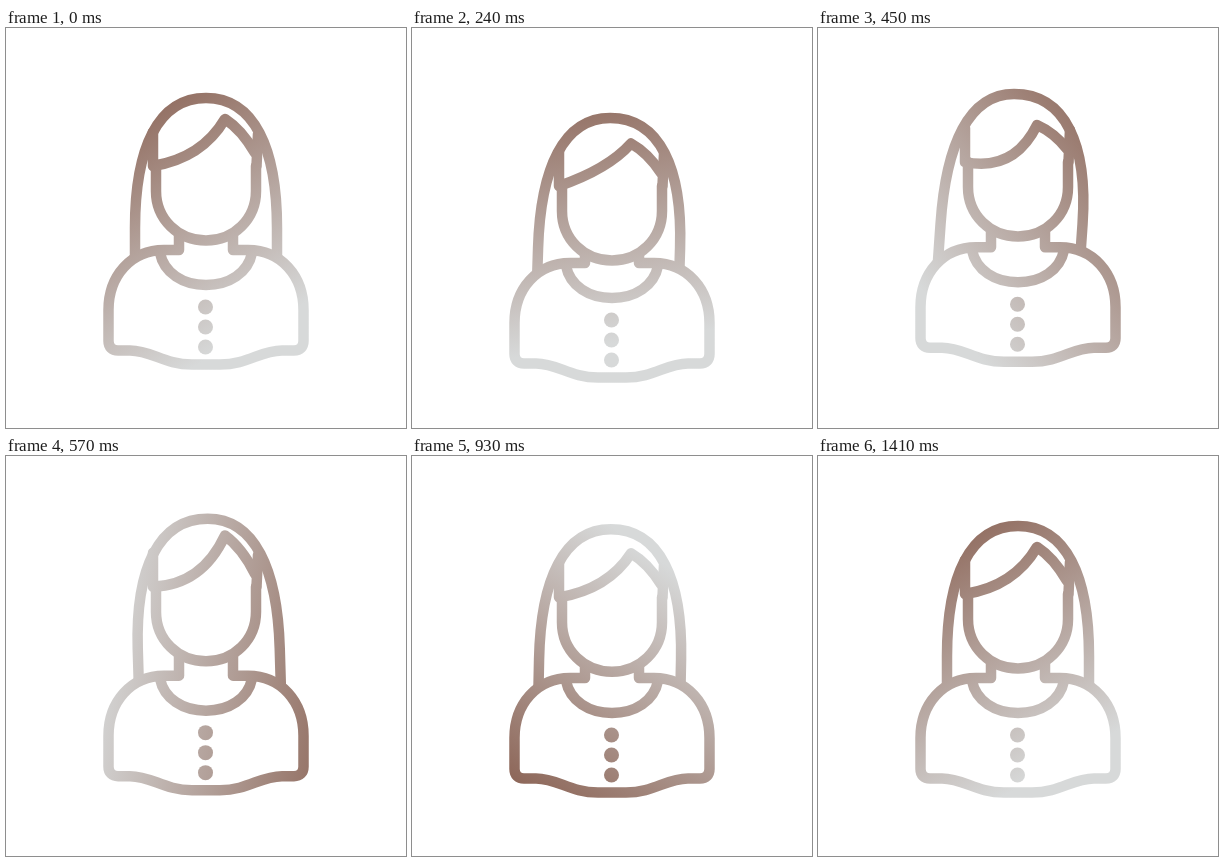
An HTML page with a canvas for the animation above (1.95 s loop, 400 by 400 pixels).

```html
<!DOCTYPE html>
<html lang="en">
<head>
<meta charset="utf-8">
<title>Avatar</title>
<style>
html, body { margin: 0; width: 100%; height: 100%; overflow: hidden; background: #fff; }
canvas { display: block; width: 400px; height: 400px; }
</style>
</head>
<body>
<canvas id="stage" width="400" height="400"></canvas>
<script>
const ctx = document.getElementById('stage').getContext('2d');
const LOOP = 1950, STEP = 30, REST = 1410, TRAIL = 90;
const DARK = '#8c6557', LIGHT = '#d7d9d9';

const linear = u => u;
const smooth = u => u * u * (3 - 2 * u);

// Moves through [ms, value] stops, holding the first and last value outside them.
const motion = (ease, ...stops) => t => stops.reduce((value, [end, to], i) => {
  if (i === 0) return to;
  const start = stops[i - 1][0];
  const u = Math.max(0, Math.min(1, (t - start) / (end - start)));
  return value + (to - stops[i - 1][1]) * ease(u);
}, 0);

const bodyY = motion(smooth, [0, 0], [180, 15], [470, -3], [800, 0]);
const headY = motion(smooth, [0, 0], [245, 20], [515, -8], [860, 3.5], [REST, 0]);
const swing = motion(smooth, [0, 0], [140, 9], [340, -18], [630, 7], [1000, -4], [REST, 0]);
const lightAngle = motion(linear, [0, -30], [330, 0], [690, 150], [930, 215], [1080, 330]);

// Shapes are offset by coordinate so the gradient stays fixed to the stage.
function trace(dy, commands, filled) {
  const place = (n, i) => i % 2 ? n + dy : n;
  const path = new Path2D(commands.map(([op, ...xy]) => op + xy.map(place).join(' ')).join(''));
  if (filled) {
    ctx.fillStyle = '#fff';
    ctx.fill(path);
  }
  ctx.stroke(path);
}

// Follows one half of a symmetric outline down, then its mirror image back up.
function mirrored(start, ...curves) {
  const flip = xy => xy.map((n, i) => i % 2 ? n : 400 - n);
  const points = [start, ...curves.flatMap(c => c.reduce(
    (pairs, n, i) => i % 2 ? pairs : [...pairs, [n, c[i + 1]]], []))];
  const back = points.map(flip).reverse();
  const bottom = back[0];
  const result = [['M', ...start], ...curves.map(c => [c.length === 2 ? 'L' : 'C', ...c]),
    ['L', ...bottom]];
  let next = 1;
  for (const c of [...curves].reverse()) {
    const count = c.length / 2;
    result.push([count === 1 ? 'L' : 'C', ...back.slice(next, next + count).flat()]);
    next += count;
  }
  return result;
}

function lightFrom(degrees) {
  const a = degrees * Math.PI / 180, dx = Math.sin(a), dy = -Math.cos(a);
  const g = ctx.createLinearGradient(
    200 + 160 * dx, 205 + 160 * dy, 200 - 110 * dx, 205 - 110 * dy);
  g.addColorStop(0, DARK);
  g.addColorStop(1, LIGHT);
  return g;
}

function drawHair(dy, s) {
  trace(dy, [
    ['M', 129 + s, 250], ['L', 129 + 0.65 * s, 200],
    ['C', 129 + 0.1 * s, 120, 152 + 0.1 * s, 70, 200 + 0.4 * s, 70],
    ['C', 248 + 0.1 * s, 70, 271 + 0.1 * s, 120, 271 + 0.65 * s, 200],
    ['L', 271 + s, 250]
  ]);
}

function drawBody(dy, paint) {
  trace(dy, mirrored([173, 202], [173, 222], [158, 222],
    [125, 222, 102.5, 248, 102.5, 282],
    [102.5, 313], [102.5, 319, 106, 322.5, 112, 322.5], [124, 322.5],
    [146, 322.5, 158, 336.5, 186, 336.5]), true);
  trace(dy, mirrored([154, 225], [158, 245, 177, 257, 200, 257]));
  ctx.fillStyle = paint;
  for (let i = 0; i < 3; i++) {
    ctx.beginPath();
    ctx.arc(199.5, 279 + 20 * i + dy, 7.5, 0, 2 * Math.PI);
    ctx.fill();
  }
}

function drawFace(dy, peak, bend) {
  trace(dy, mirrored([150, 138], [150, 163], [150, 191, 172, 212.5, 200, 212.5]), true);
  trace(dy, [
    ['M', 147, 104], ['L', 147, 138],
    ['Q', 196, 130 + bend, 219, 91 + peak],
    ['Q', 236, 102 + 0.65 * peak, 249, 125]
  ]);
  trace(dy, [['M', 252, 106], ['L', 250.5, 138]]);
}

function draw(t) {
  const paint = lightFrom(lightAngle(t));
  ctx.fillStyle = '#fff';
  ctx.fillRect(0, 0, 400, 400);
  ctx.strokeStyle = paint;
  ctx.lineWidth = 10.5;
  ctx.lineJoin = ctx.lineCap = 'round';
  drawHair(headY(t), swing(t));
  drawBody(bodyY(t), paint);
  // The fringe tip swings with the hair and its curve follows a moment later.
  drawFace(headY(t), -swing(t), -swing(t - TRAIL));
}

function frame() {
  const t = performance.now() % LOOP;
  draw(Math.min(REST, Math.floor(t / STEP) * STEP));
  requestAnimationFrame(frame);
}
frame();
</script>
</body>
</html>
```
